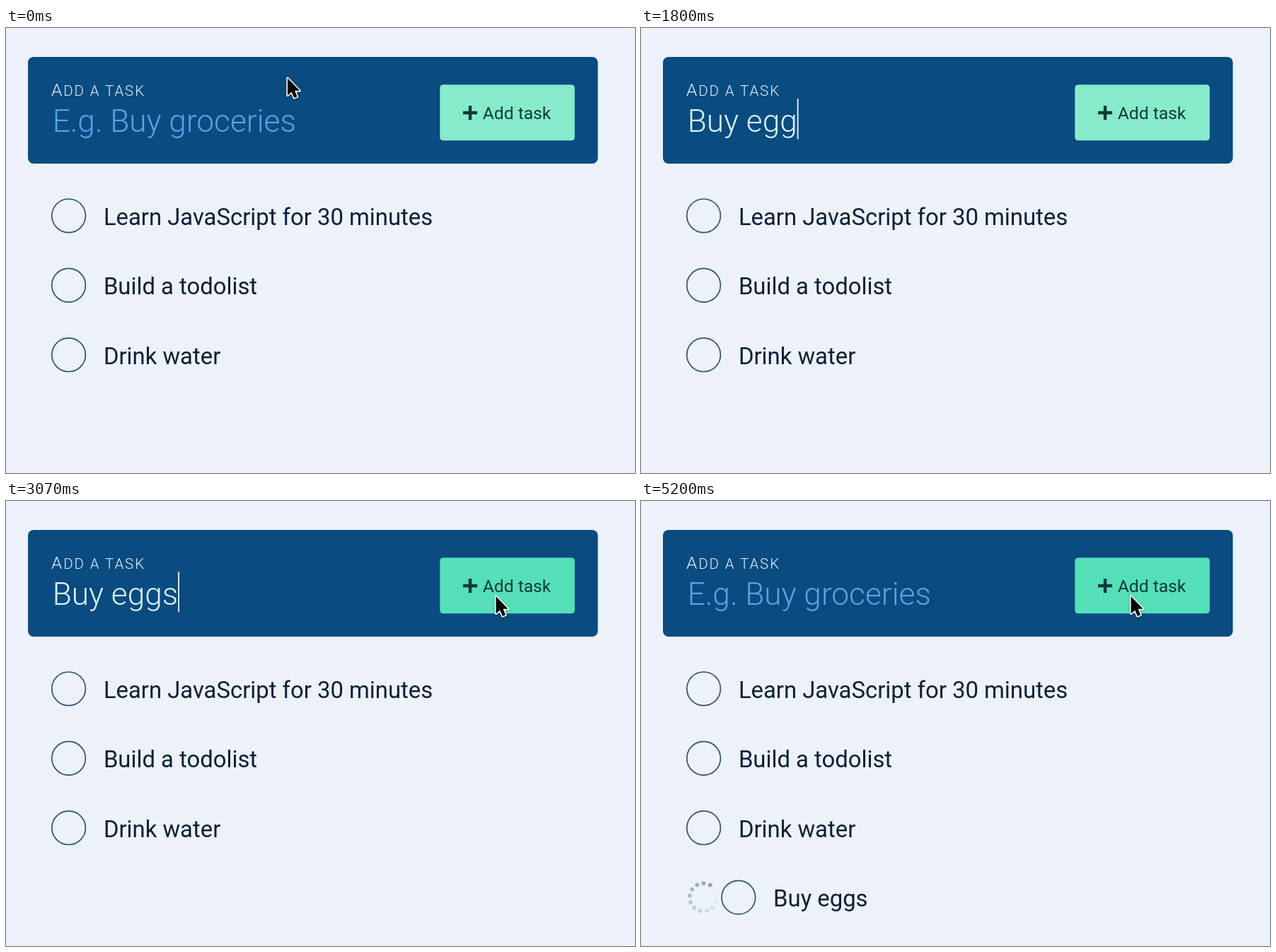
An HTML page for the animation above (5270 ms loop, 889 by 630 pixels).

```html
<!DOCTYPE html>
<html lang="en">
<head>
<meta charset="utf-8">
<title>Todo list</title>
<style>
  html, body { margin: 0; width: 100%; height: 100%; overflow: hidden; background: #edf1f9; }
  svg { display: block; width: 100vw; height: 100vh; font-family: Roboto, sans-serif; }
  text { white-space: pre; }
  .label { font-weight: 300; font-size: 20.5px; letter-spacing: 1.9px; fill: #e3f3ff; }
  .label .cap { font-size: 24.6px; }
  .field { font-weight: 300; font-size: 44.2px; }
  #hint { fill: #56a4e5; }
  #typed { fill: #dcf1ff; }
  .button { font-size: 24.6px; fill: #0b3b39; }
  .row text { font-size: 32.83px; fill: #0b1f38; }
  .row circle { fill: none; stroke: #2f5275; stroke-width: 1.7; }
  #arrow { filter: drop-shadow(0 1.5px 1.5px rgba(0, 0, 0, .3)); }
</style>
</head>
<body>
<svg viewBox="0 0 889 630">
  <rect width="889" height="630" fill="#edf1f9"/>
  <rect x="31" y="41" width="805.5" height="151" rx="8" fill="#0a4b80"/>
  <text class="label" x="64" y="96"><tspan class="cap">A</tspan>DD A TASK</text>
  <text id="hint" class="field" x="65.7" y="147">E.g. Buy groceries</text>
  <text id="typed" class="field" x="65.7" y="147"></text>
  <rect id="caret" y="100" width="1.8" height="57.5" fill="#e8f4ff"/>

  <rect id="button" x="613.3" y="80.3" width="190.5" height="79" rx="4.5"/>
  <path d="M646 120H666M656 110V130" stroke="#0b3b39" stroke-width="4.4"/>
  <text class="button" x="673.8" y="129.3">Add task</text>

  <g id="rows"></g>
  <g id="spinner"></g>

  <g id="arrow">
    <path d="M0 0V24.5L5.6 19.4L9.3 28L13.6 26.2L10 17.8H17.2Z" fill="#000"
      stroke="#fff" stroke-width="3.2" stroke-linejoin="round" paint-order="stroke"/>
  </g>
  <g id="beam" fill="none" stroke-linecap="round" stroke-linejoin="round">
    <path id="beamShape" d="M-5 -12.5Q0 -12.5 0 -9Q0 -12.5 5 -12.5M0 -9V9M-5 12.5Q0 12.5 0 9Q0 12.5 5 12.5M-2.8 3H2.8"
      stroke="#fff" stroke-width="4.8"/>
    <use href="#beamShape"/>
    <path d="M-5 -12.5Q0 -12.5 0 -9Q0 -12.5 5 -12.5M0 -9V9M-5 12.5Q0 12.5 0 9Q0 12.5 5 12.5M-2.8 3H2.8"
      stroke="#000" stroke-width="2.1"/>
  </g>
</svg>
<script>
  const LOOP = 5270, STEP = 66.7;
  const DOTS = 13, BLINK = 8;
  const FOCUS = 6, HIDE = 13, SHOW = 36, SUBMIT = 47;
  const TEXT = "Buy eggs";
  const KEYS = [13, 16, 19, 21, 23, 25, 27, 29];
  const $ = id => document.getElementById(id);
  const [hint, typed, caret, button, arrow, beam] =
    ["hint", "typed", "caret", "button", "arrow", "beam"].map($);

  function add(parent, name, attrs) {
    const el = document.createElementNS("http://www.w3.org/2000/svg", name);
    for (const key in attrs) el.setAttribute(key, attrs[key]);
    return parent.appendChild(el);
  }

  function addRow(label, i, indent = 0) {
    const row = add($("rows"), "g", { class: "row" });
    const y = 265.8 + 98.45 * i;
    add(row, "circle", { cx: 88.6 + indent, cy: y, r: 23.8 });
    add(row, "text", { x: 137.9 + indent, y: y + 12.9 }).textContent = label;
    return row;
  }

  ["Learn JavaScript for 30 minutes", "Build a todolist", "Drink water"]
    .forEach((label, i) => addRow(label, i));
  const newRow = addRow(TEXT, 3, 49.2);

  const dots = Array.from({ length: DOTS }, (_, i) => {
    const a = i / DOTS * 2 * Math.PI;
    return add($("spinner"), "circle", {
      cx: 88.5 + 19.7 * Math.sin(a), cy: 561 - 19.7 * Math.cos(a), r: 2.9
    });
  });

  const show = (el, on) => el.setAttribute("visibility", on ? "visible" : "hidden");
  const mix = (a, b, u) => a + (b - a) * u;
  const ease = u => { u = Math.min(1, Math.max(0, u)); return u * u * (3 - 2 * u); };

  function pointer(n) {
    if (n < SHOW) {
      const u = ease(n / 5);
      return [mix(398, 387, u), mix(71, 138.5, u)];
    }
    const u = ease((n - SHOW) / 7.75);
    return [mix(387, 692.5, u), mix(138.5, 135, u)];
  }

  function drawPointer(n) {
    const [x, y] = pointer(n);
    const visible = n < HIDE || n >= SHOW;
    const overField = y > 98 && x < 580;
    for (const el of [arrow, beam]) el.setAttribute("transform", `translate(${x} ${y})`);
    show(arrow, visible && !overField);
    show(beam, visible && overField);
    button.setAttribute("fill", x > 613 ? "#54dfb9" : "#86ebca");
  }

  function drawField(n) {
    const count = n < SUBMIT ? KEYS.filter(k => k <= n).length : 0;
    typed.textContent = TEXT.slice(0, count);
    show(hint, !count);
    // the blink restarts at each key press
    const last = Math.max(...[FOCUS, ...KEYS, SUBMIT].filter(k => k <= n));
    show(caret, n >= FOCUS && Math.floor((n - last) / BLINK) % 2 === 0);
    caret.setAttribute("x", 65.7 + (count ? typed.getComputedTextLength() : 0));
  }

  function drawSpinner(n) {
    const head = -0.7 + (n - 49) * 0.963;
    dots.forEach((dot, i) => {
      const age = (((head - i) % DOTS) + DOTS) % DOTS / DOTS;
      const rgb = [[136, 163, 187], [246, 249, 253]];
      dot.setAttribute("fill", `rgb(${rgb[0].map((c, k) => Math.round(mix(c, rgb[1][k], age)))})`);
    });
    show($("spinner"), n >= SUBMIT);
    show(newRow, n >= SUBMIT);
  }

  const start = performance.now();
  function draw(now) {
    const t = Math.max(0, now - start) % LOOP;
    const n = Math.min(78, Math.floor((t + 5) / STEP));
    drawPointer(n);
    drawField(n);
    drawSpinner(n);
    requestAnimationFrame(draw);
  }
  draw(start);
</script>
</body>
</html>
```
